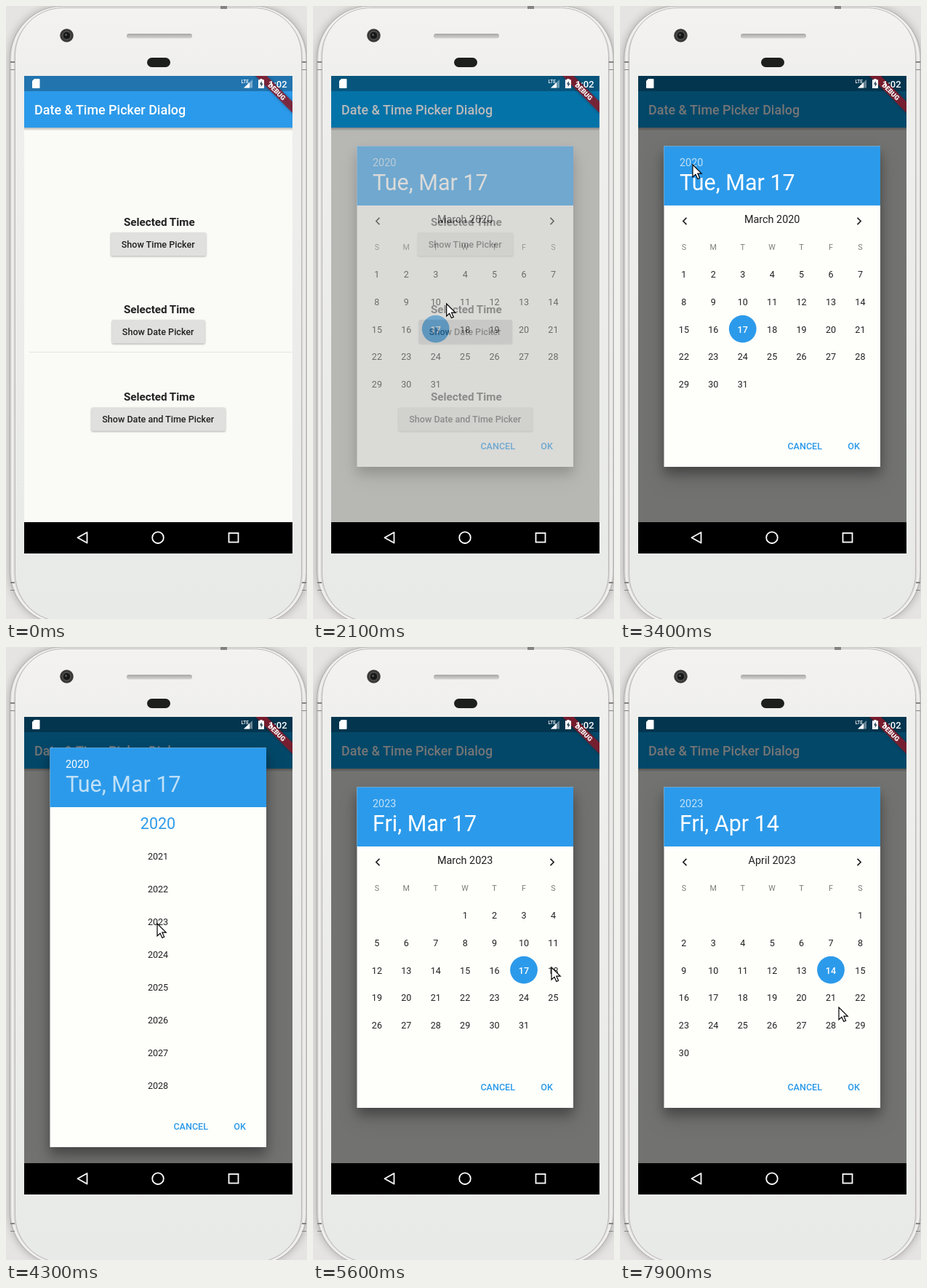
Animation of 414 by 842 pixels, one loop 8000 ms. Source, as an HTML page:

```html
<!DOCTYPE html>
<html lang="en">
<head>
<meta charset="utf-8">
<title>Date picker demo</title>
<style>
  html, body { margin: 0; width: 100%; height: 100%; overflow: hidden; background: #e6e4e2; }
  svg { display: block; width: 100%; height: 100%; }
  text { font: 400 12.57px Roboto, sans-serif; fill: #212121; white-space: pre; }
  .mid { text-anchor: middle; }
  .medium { font-weight: 500; }
  .label { font-size: 15.2px; font-weight: 700; }
  .small { font-size: 14.4px; }
  .big { font-size: 30.5px; }
  .white { fill: #fff; }
  .blue { fill: #2c9aea; }
  .weekday { font-size: 10.8px; fill: #7d7d7b; }
  .raised { fill: #e0e0de; filter: drop-shadow(0 1.3px 1.1px rgba(0, 0, 0, .3)); }
  .sheet { fill: #fefefb; filter: drop-shadow(0 9px 8px rgba(0, 0, 0, .3)) drop-shadow(0 12px 13px rgba(0, 0, 0, .15)); }
  .appBar { fill: #2c9aea; }
  .statusBar { fill: #2274ae; }
  .divider { stroke: #e5e6e2; }
  .dimmed .appBar { fill: #069de6; }
  .dimmed .statusBar { fill: #0975aa; }
  .dimmed .divider { stroke: none; }
</style>
</head>
<body>
<svg id="stage" viewBox="0 0 414 842" preserveAspectRatio="none">
  <defs>
    <linearGradient id="shell" x2="0" y2="1">
      <stop stop-color="#f3f2f0"/><stop offset=".12" stop-color="#efefed"/><stop offset="1" stop-color="#e8eae8"/>
    </linearGradient>
    <linearGradient id="slot" x2="0" y2="1">
      <stop stop-color="#a9a7a6"/><stop offset="1" stop-color="#d6d4d3"/>
    </linearGradient>
    <linearGradient id="barShadow" x2="0" y2="1">
      <stop stop-color="#000" stop-opacity=".3"/><stop offset="1" stop-color="#000" stop-opacity="0"/>
    </linearGradient>
    <clipPath id="screen"><rect x="25" y="96" width="369" height="656"/></clipPath>
    <clipPath id="calendar"><rect x="60.5" y="275" width="297.5" height="300"/></clipPath>
  </defs>

  <!-- phone body -->
  <rect width="414" height="842" fill="#e6e4e2"/>
  <rect x="5.5" y=".5" width="408" height="848" rx="72" fill="#dddbd9" stroke="#aeacaa" style="filter:drop-shadow(0 0 6px rgba(0,0,0,.25))"/>
  <rect x="9" y="2" width="401" height="845" rx="69" fill="none" stroke="#f1f0ef" stroke-width="2.5"/>
  <rect x="12.5" y="2.5" width="394" height="843" rx="66" fill="url(#shell)" stroke="#bab8b6"/>
  <g fill="#858381">
    <rect x="295" width="9" height="4"/>
    <path d="M6 76h6v2h-6zM6 87h6v1h-6zM407 76h6v2h-6zM407 87h6v1h-6zM6 791h6v2h-6zM6 802h6v1h-6zM407 791h6v2h-6zM407 802h6v1h-6z"/>
  </g>
  <circle cx="83.5" cy="40.5" r="9.3" fill="#3b3a38"/>
  <circle cx="83.5" cy="40.5" r="5.5" fill="#161717" stroke="#696763"/>
  <circle cx="82.5" cy="39.5" r="1.5" fill="#55575a"/>
  <rect x="166" y="38" width="90" height="6.5" rx="3" fill="url(#slot)"/>
  <rect x="194" y="71" width="32" height="13" rx="6.5" fill="#1d1f1d"/>

  <!-- app page -->
  <g clip-path="url(#screen)">
    <rect x="25" y="96" width="369" height="656" fill="#fafbf7"/>
    <rect x="25" y="166.5" width="369" height="5" fill="url(#barShadow)"/>
    <rect class="appBar" x="25" y="117" width="369" height="50"/>
    <rect class="statusBar" x="25" y="96" width="369" height="21"/>
    <text class="medium white" x="39" y="149" style="font-size:17.96px">Date &amp; Time Picker Dialog</text>
    <path class="divider" id="firstDivider" d="M32 355.5H393"/>
    <path class="divider" d="M32 475.5H393"/>
    <g id="rows"></g>
    <rect id="barrier" x="25" y="96" width="369" height="613"/>
    <g id="dialog"></g>

    <!-- banner, then system bars above it -->
    <g transform="translate(394 96) rotate(45)">
      <rect x="-52" y="25" width="104" height="10.9" fill="#8f1a2a" fill-opacity=".82" style="filter:drop-shadow(0 0 2px rgba(0,0,0,.4))"/>
      <text class="mid white" x="0" y="33.7" style="font-size:9.2px;font-weight:900">DEBUG</text>
    </g>
    <rect x="25" y="709" width="369" height="43"/>
    <g fill="none" stroke="#fff" stroke-width="1.8">
      <path d="M111.5 723v14.5L98.5 730.2z" stroke-linejoin="round"/>
      <circle cx="209" cy="730.2" r="7.8"/>
      <rect x="306.5" y="724" width="13" height="12.5"/>
    </g>
    <path d="M39 100h6.5q1 0 1 1v11q0 1-1 1h-8.5q-1 0-1-1v-9z" fill="#fff"/>
    <path d="M339 101v11.5h-12z" fill="#fff" opacity=".4"/>
    <path d="M335 105v7.5h-8z" fill="#fff"/>
    <text class="white medium" x="323.5" y="105.8" style="font-size:6.5px">LTE</text>
    <path d="M349.5 100h3v1.3h2.5v11.7h-8v-11.7h2.5z" fill="#fff"/>
    <path d="M351.8 103l-3 4.6h1.9v3.4l3-4.6h-1.9z" fill="#2d485b"/>
    <text class="white medium" x="361" y="111.5" style="font-size:13px">1:02</text>
  </g>
  <path id="cursor" d="M0 0V17L4 13.3L6.8 19.5L9.6 18.2L6.9 12.2H12.2Z" fill="#fff" stroke="#000" stroke-width="1.2"/>
</svg>
<script>
const LOOP = 8000, STEP = 100;
const $ = id => document.getElementById(id);
const lerp = (a, b, k) => a + (b - a) * k;
const clamp01 = k => Math.min(1, Math.max(0, k));
const ease = k => k * k * (3 - 2 * k);
const text = (x, y, cls, str, extra = '') => `<text x="${x}" y="${y}" class="${cls}" ${extra}>${str}</text>`;

const MONTHS = ['January', 'February', 'March', 'April'];
const DAYS = ['Sun', 'Mon', 'Tue', 'Wed', 'Thu', 'Fri', 'Sat'];
const weekday = (y, m, d) => new Date(Date.UTC(y, m, d)).getUTCDay();

// [time, x, y]
const CURSOR_PATH = [
  [600, -14, 225], [1100, 121, 257], [1200, 126, 270], [1500, 186, 444],
  [2000, 186, 444], [2300, 179, 339], [2900, 125, 255], [3000, 125, 255],
  [3400, 100, 218], [3600, 100, 218], [4300, 208, 380], [5000, 208, 380],
  [5600, 328, 440], [5700, 328, 440], [5900, 304, 345], [6000, 322, 298],
  [7000, 322, 298], [7300, 345, 370], [7600, 300, 447], [7800, 300, 447], [7900, 301, 495]
];

function cursorAt(t) {
  const next = CURSOR_PATH.findIndex(p => p[0] > t);
  if (next === 0) return [-40, 0];
  if (next < 0) return CURSOR_PATH.at(-1).slice(1);
  const [a, b] = [CURSOR_PATH[next - 1], CURSOR_PATH[next]];
  const k = (t - a[0]) / (b[0] - a[0]);
  return [lerp(a[1], b[1], k), lerp(a[2], b[2], k)];
}

$('rows').innerHTML = [['Time', 131], ['Date', 128], ['Date and Time', 184.5]].map(([name, w], i) => {
  const y = 120.2 * i;
  return text(210.8, 301.5 + y, 'mid label', 'Selected Time') +
    `<rect class="raised" x="${209.7 - w / 2}" y="${311 + y}" width="${w}" height="32.3" rx="1.8"/>` +
    text(209.2, 331.5 + y, 'mid medium', `Show ${name} Picker`);
}).join('') + '<rect id="press" x="145.7" y="431" width="128" height="32.3" rx="1.8" opacity="0"/>';

function monthPage(year, month, selected, shift) {
  let out = text(209.2, 298.3, 'mid small', `${MONTHS[month]} ${year}`);
  const colX = c => 87.9 + 40.42 * c;
  [...'SMTWTFS'].forEach((s, c) => out += text(colX(c), 335, 'mid weekday', s));
  const first = weekday(year, month, 1);
  const count = new Date(Date.UTC(year, month + 1, 0)).getUTCDate();
  for (let d = 1; d <= count; d++) {
    const cell = first + d - 1, x = colX(cell % 7), y = 368.6 + 37.7 * Math.floor(cell / 7);
    const on = d === selected;
    if (on) out += `<circle class="blue" cx="${x}" cy="${y - .4}" r="18.9"/>`;
    out += text(x, y + 4.5, on ? 'mid medium white' : 'mid', d);
  }
  return `<g transform="translate(${shift} 0)">${out}</g>`;
}

function sheet(top, bottom, year, date, yearMode) {
  const fade = on => on ? '' : 'opacity=".7"';
  return `<rect class="sheet" x="60.5" y="${top}" width="297.5" height="${bottom - top}"/>
    <rect class="blue" x="60.5" y="${top}" width="297.5" height="81.5"/>` +
    text(82, top + 27.7, 'small white', year, fade(yearMode)) +
    text(82, top + 60.5, 'big white', date, fade(!yearMode)) +
    text(254.2, bottom - 24, 'mid medium blue', 'CANCEL') +
    text(321.5, bottom - 24, 'mid medium blue', 'OK');
}

function yearDialog() {
  let out = sheet(138.5, 687, 2020, 'Tue, Mar 17', true);
  out += text(209, 250.3, 'mid blue', 2020, 'style="font-size:21.5px"');
  for (let i = 1; i < 9; i++) out += text(209, 247.3 + 44.9 * i, 'mid', 2020 + i);
  return out;
}

function dayDialog(t) {
  const year = t < 4600 ? 2020 : 2023;
  const picked = t >= 7900;
  const [month, day] = picked ? [3, 14] : [2, 17];
  const date = `${DAYS[weekday(year, month, day)]}, ${MONTHS[month].slice(0, 3)} ${day}`;
  const slide = ease(clamp01((t - 6700) / 400)) * 297.5;
  let pages = '';
  if (slide < 297) pages += monthPage(year, 2, 17, -slide);
  if (slide > 0) pages += monthPage(2023, 3, picked ? 14 : 0, 297.5 - slide);
  const splash = clamp01((t - 6100) / 200) * clamp01((6800 - t) / 300) * .1;
  return sheet(192.5, 633, year, date, false) +
    `<circle cx="329" cy="296" r="21" opacity="${splash}"/>
    <g clip-path="url(#calendar)">${pages}</g>
    <path d="M91.5 290.8l-4.6 4.7 4.6 4.7M326.5 290.8l4.6 4.7-4.6 4.7" fill="none" stroke="#212121" stroke-width="1.7"/>`;
}

function draw(t) {
  const shown = clamp01((t - 2000) / 200);
  $('stage').classList.toggle('dimmed', shown > 0);
  $('firstDivider').setAttribute('opacity', t < 400 ? 0 : 1);
  $('press').setAttribute('opacity', t >= 1800 && t < 2200 ? .1 : 0);
  $('barrier').setAttribute('opacity', .54 * shown);
  $('dialog').setAttribute('opacity', shown);
  $('dialog').innerHTML = !shown ? '' : t >= 3700 && t < 4600 ? yearDialog() : dayDialog(t);
  $('cursor').setAttribute('transform', `translate(${cursorAt(t)})`);
}

const start = performance.now();
let last = -1;
function tick() {
  const t = Math.floor((performance.now() - start) % LOOP / STEP) * STEP;
  if (t !== last) draw(last = t);
  requestAnimationFrame(tick);
}
tick();
</script>
</body>
</html>
```
